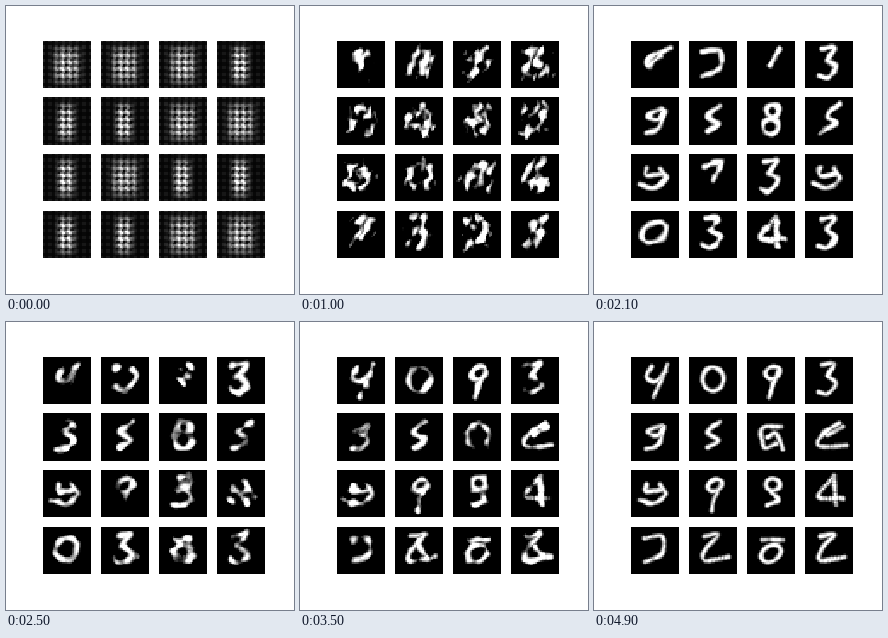
A matplotlib script that plays this animation: 288 px wide and 288 px high, repeating every 5100 ms.

```python
import numpy as np
import matplotlib.pyplot as plt
from matplotlib.animation import FuncAnimation

SIZE, TICKS, LAST = 28, 51, 49
Y, X = np.mgrid[0:SIZE, 0:SIZE] + 0.5


def line(*coords, steps=10):
    """Catmull-Rom stroke through the given x, y pairs."""
    points = np.array(coords, float).reshape(-1, 2)
    p = np.vstack([2 * points[0] - points[1], points, 2 * points[-1] - points[-2]])
    t = np.linspace(0, 1, steps)[:, None]
    return np.vstack([
        b + 0.5 * t * (c - a + t * (2 * a - 5 * b + 4 * c - d
                                    + t * (3 * (b - c) + d - a)))
        for a, b, c, d in zip(p, p[1:], p[2:], p[3:])])


def ring(cx, cy, rx, ry, lean=0.0):
    t = np.linspace(0, 2 * np.pi, 60)
    dy = ry * np.sin(t)
    return np.column_stack([cx + rx * np.cos(t) - lean * dy, cy + dy])


def glyph(name):
    """Dots along the strokes of one handwritten shape."""
    match name:
        case "0": parts = [ring(14, 13.5, 6, 7)]
        case "O": parts = [ring(14.5, 14, 4.5, 8, 0.3)]
        case "W": parts = [ring(13.5, 13, 7, 6, 0.3)]
        case "1": parts = [line(19, 5, 13, 15)]
        case "2": parts = [line(9, 6, 17, 5, 10, 13, 9, 20, 23, 18)]
        case "Z": parts = [glyph("2"), line(14, 12, 19, 18)]
        case "3": parts = [line(10, 5, 17, 4.5, 13, 11.5),
                           line(13, 11.5, 18, 16, 13, 22, 8, 21)]
        case "4": parts = [line(12, 6, 9, 12, 14, 15, 20, 9),
                           line(21, 5, 18, 13, 13, 24)]
        case "A": parts = [line(17, 4, 8, 16, 22, 17), line(17, 6, 18, 21)]
        case "5": parts = [line(18, 5, 11, 11, 17, 16, 11, 20)]
        case "S": parts = [line(20, 4, 13, 11, 18, 15, 9, 21)]
        case "E": parts = [line(20, 6, 11, 12, 8, 19, 24, 19), line(13, 13, 22, 8)]
        case "7": parts = [line(9, 8, 19, 5, 14, 16)]
        case "8": parts = [ring(15, 9, 4, 3.5), line(14, 13, 18, 18, 12, 21)]
        case "B": parts = [ring(15, 8, 3.5, 3.5), ring(14, 17, 4.5, 4.5)]
        case "9": parts = [ring(15, 9.5, 4, 3.5, 0.3), line(19, 8, 15, 17, 13, 24)]
        case "g": parts = [line(18, 7, 10, 11, 16, 13, 19, 8),
                           line(19, 9, 16, 18, 9, 21)]
        case "D": parts = [line(8, 7, 18, 6, 18, 16, 8, 21)]
        case "e": parts = [line(23, 5, 11, 10, 10, 15, 17, 9)]
        case "a": parts = [line(9, 9, 9, 13, 19, 12),
                           line(17, 9, 20, 15, 13, 20, 5, 18)]
        case "n": parts = [line(9, 18, 9, 10, 15, 6, 20, 11, 20, 20)]
        case "Q": parts = [line(20, 8, 9, 9, 10, 20, 17, 18),
                           line(12, 14, 17, 12, 21, 21)]
        case "U": parts = [line(9, 6, 9, 18, 15, 21, 21, 12, 19, 8)]
        case "o": parts = [ring(14, 16, 5.5, 5, 0.3), line(9, 8, 21, 8)]
        case _: parts = [line(17, 7, 12, 11, 14, 15, 15, 11)]
    return np.vstack(parts)


def smooth_noise(rng, waves=7):
    field = np.zeros((SIZE, SIZE))
    for _ in range(waves):
        kx, ky = rng.uniform(-0.9, 0.9, 2)
        field += np.sin(kx * X + ky * Y + rng.uniform(0, 2 * np.pi))
    return field / np.sqrt(waves / 2)


def stroke_level(name, radius, rough, rng):
    """Brightness level, positive inside the brush and negative outside."""
    dots = glyph(name)
    gap = np.hypot(X[..., None] - dots[:, 0], Y[..., None] - dots[:, 1]).min(-1)
    level = 0.5 + (radius - gap) / 1.5 + rough * smooth_noise(rng)
    return np.clip(level, -2, 1.8)


def woven_level(narrow, rng):
    """Soft blob with the four-cell weave of an untrained network."""
    width, cx, peak = (5, 13.5, 1.1) if narrow else (7.5, 14, 0.95)
    glow = np.exp(-((X - cx) / width) ** 4 - ((Y - 14.5) / 10.5) ** 4)
    phase = np.pi / 2
    slant = np.cos(phase * (X + 0.6 * np.abs((Y % 4) - 2)))
    weave = 0.5 + 0.28 * np.cos(phase * (Y - 1)) + 0.24 * slant
    grain = rng.uniform(-0.12, 0.12, (SIZE, SIZE))
    grid = 0.04 * (1 + np.cos(phase * X)) * (1 + np.cos(phase * Y))
    return np.clip(glow * (peak * weave + grain) + grid * width / 8 + 0.02, 0, 1)


def striped_level(rng):
    """Leaning, bending bands that fade out near the tile edge."""
    lean = rng.uniform(0.1, 0.55)
    across = X + lean * (Y - 14) + 0.9 * smooth_noise(rng, 4)
    bands = np.cos(2 * np.pi * across / 6.3 + rng.uniform(0, 2 * np.pi))
    edge = ((X - 14) / 10.5) ** 4 + ((Y - 13.5) / 11) ** 4
    level = 0.35 + 1.1 * bands - edge + 0.35 * smooth_noise(rng)
    return np.clip(level, -2, 1.8)


# tick, brush radius, roughness, the sixteen shapes row by row
STAGES = [
    (14, 1.65, 0.30, "*OSZ nABD anEA 73DS"),
    (21, 1.45, 0.20, "eD13 g5BS a73a W3A3"),
    (29, 1.25, 0.16, "4U9Z 350E a9BA 0ZoZ"),
    (42, 1.25, 0.14, "4093 g5nE a98A DZoZ"),
    (49, 1.25, 0.12, "4093 g5QE a98A D2o2"),
]
OPENING = "wwwn nnww nwnn nnww"  # wide or narrow glow

rng = np.random.default_rng(4)
times = [0, 6] + [stage[0] for stage in STAGES]
levels = [[woven_level(c == "n", rng) for c in OPENING.replace(" ", "")],
          [striped_level(rng) for _ in range(16)]]
for _, radius, rough, names in STAGES:
    levels.append([stroke_level(c, radius, rough, rng)
                   for c in names.replace(" ", "")])
levels = np.array(levels)


def tiles_at(tick):
    tick = min(tick, LAST)
    k = min(np.searchsorted(times, tick, side="right") - 1, len(times) - 2)
    u = (tick - times[k]) / (times[k + 1] - times[k])
    noise = np.random.default_rng(100 + tick)
    wobble = 0.35 * np.sin(np.pi * u)
    mix = (1 - u) * levels[k] + u * levels[k + 1]
    return [np.clip(m + wobble * smooth_noise(noise), 0, 1) for m in mix]


fig, axes = plt.subplots(4, 4, figsize=(4, 4), dpi=72, facecolor="white")
fig.subplots_adjust(left=0.125, right=0.9, bottom=0.125, top=0.88,
                    wspace=0.2, hspace=0.2)
images = []
for ax, tile in zip(axes.flat, tiles_at(0)):
    ax.axis("off")
    images.append(ax.imshow(tile, cmap="gray", vmin=0, vmax=1,
                            interpolation="nearest"))


def update(tick):
    for image, tile in zip(images, tiles_at(tick)):
        image.set_data(tile)
    return images


anim = FuncAnimation(fig, update, frames=TICKS, interval=100, repeat=True,
                     repeat_delay=0, blit=False)
plt.show()
```
